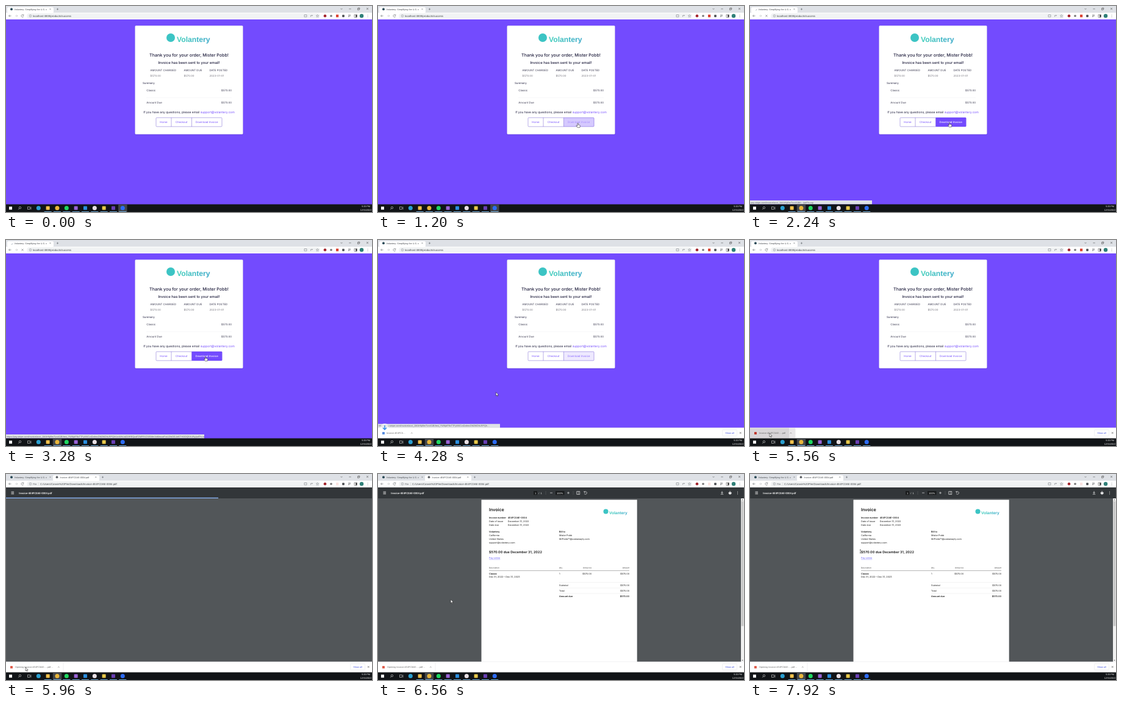
An HTML page for the animation above (8 s loop, 600 px wide and 338 px high).

```html
<!DOCTYPE html>
<html lang="en">
<head>
<meta charset="utf-8">
<title>Invoice download</title>
<style>
html, body { margin: 0; width: 100%; height: 100%; overflow: hidden; }
svg { display: block; text-rendering: geometricPrecision; }
#stage { width: 600px; height: 338px; font-family: "Liberation Sans", Arial, sans-serif; }
.inter { font-family: Inter, sans-serif; }
</style>
</head>
<body>
<svg id="stage" viewBox="0 0 600 338"></svg>
<script>
const DURATION = 8000;
const PURPLE = '#734bfe', INK = '#1c1b3a', GREY = '#5f6368';
const BRAND = 'Volantery', FILE = 'Invoice-4E4FC0AE-0004.pdf';
const URL_HEAD = 'pay.stripe.com/invoice/acct_1MAHfyBmTvrxX1B/t';
const LONG_URL = `https://${URL_HEAD}est_YWNjdF8xTTFyMXCztZzdmcDM2MDhLRPQhVzcWhUaDZrREQzaFZMFRVZXI5MmVoMmxwFsrU2htOGJzNTYtODQ5VURy/pdf?s=ap`;

const text = (x, y, s, size, fill, more = '') =>
  `<text x="${x}" y="${y}" font-size="${size}" fill="${fill}" ${more}>${s}</text>`;
const rect = (x, y, w, h, fill, more = '') =>
  `<rect x="${x}" y="${y}" width="${w}" height="${h}" fill="${fill}" ${more}/>`;
const dot = (x, y, r, fill, more = '') =>
  `<circle cx="${x}" cy="${y}" r="${r}" fill="${fill}" ${more}/>`;
const line = (d, stroke, width = .5) =>
  `<path d="${d}" fill="none" stroke="${stroke}" stroke-width="${width}"/>`;
const group = (id, body, more = '') => `<g id="${id}" ${more}>${body}</g>`;
const cross = (x, y, r, stroke = GREY, width = .5) =>
  line(`M${x - r} ${y - r}l${2 * r} ${2 * r}m0 ${-2 * r}l${-2 * r} ${2 * r}`, stroke, width);
const plus = (x, y, r, stroke) => line(`M${x - r} ${y}h${2 * r}M${x} ${y - r}v${2 * r}`, stroke, .6);
const MID = 'text-anchor="middle"', END = 'text-anchor="end"';
const MEDIUM = 'font-weight="500"', BOLD = 'font-weight="600"';

function logo(x, y, r, tx, ty, size) {
  return dot(x, y, r, '#3cc4c4') + text(tx, ty, BRAND, size, 'url(#teal)', 'font-weight="700" font-family="Liberation Sans, sans-serif"');
}

function site() {
  const small = (x, y, s, fill = '#3b3a50', more) => text(x, y, s, 4.38, fill, more);
  return rect(0, 22, 600, 304, PURPLE)
    + rect(211, 32.6, 178, 179, '#3a1fb0', 'rx="2" opacity=".3"')
    + rect(211.5, 32.2, 177, 178.3, '#fff', 'rx="1.5"')
    + logo(270, 52, 7, 280, 59.2, 12.2)
    + text(300, 83, 'Thank you for your order, Mister Pobb!', 7.05, INK, `${MID} ${MEDIUM}`)
    + text(300, 95.1, 'Invoice has been sent to your email!', 5.92, INK, `${MID} ${MEDIUM}`)
    + [[236.6, 'AMOUNT CHARGED', '$570.00'], [291.4, 'AMOUNT DUE', '$570.00'], [333.4, 'DATE POSTED', '2023-01-01']]
      .map(([x, a, b]) => small(x, 106.8, a) + small(x, 115.6, b, '#77767f')).join('')
    + small(224, 127.7, 'Summary', INK)
    + small(230.3, 140.2, 'Classic') + small(370, 140.2, '$570.00', '#3b3a50', END)
    + line('M230 150.5H370', '#eeeef2')
    + small(230.3, 160.2, 'Amount Due') + small(370, 160.2, '$570.00', '#3b3a50', END)
    + text(300, 176.1, `If you have any questions, please email <tspan fill="${PURPLE}">support@volantery.com</tspan>`, 4.98, INK, MID)
    + rect(246, 183.2, 108, 14.7, '#fff', 'rx="1.2" stroke="#8a78d8" stroke-width=".6"')
    + line('M271 183v15M304.5 183v15', '#8a78d8', .6)
    + small(258.4, 192.3, 'Home', PURPLE, MID) + small(287.6, 192.3, 'Checkout', PURPLE, MID)
    + small(329.2, 192.3, 'Download Invoice', PURPLE, MID)
    + group('hover', rect(304.5, 183, 49.8, 15, PURPLE, 'rx="1"') + small(329.2, 192.3, 'Download Invoice', '#fff', `${MID} ${MEDIUM}`));
}

function pdf() {
  const body = (x, y, s, more = '') => text(x, y, s, 3.75, '#1a1a1a', more);
  const head = (x, s, more) => text(x, 155.3, s, 3.1, '#333', more);
  const rows = (x, y, step, list, more) => list.map((s, i) => body(x, y + i * step, s, more)).join('');
  const icons = line('M275 28v6M320 28v6', '#6d7073', .4)
    + rect(255, 28, 6, 6.2, '#191b1c') + rect(291, 28, 14.5, 6.2, '#191b1c')
    + text(258, 32.5, '1', 4, '#fff', MID) + text(263.2, 32.5, '/ &#160;1', 4, '#fff')
    + text(298.2, 32.5, '100%', 4, '#fff', MID)
    + line('M282 31h4', '#fff', .6) + plus(312, 31, 1.9, '#fff')
    + rect(325.8, 28.7, 5, 4.6, 'none', 'stroke="#fff" stroke-width=".6"') + line('M328.3 28.7v4.6', '#fff')
    + line('M338 30a2.3 2.3 0 1 1 0 2M338 28v2h2', '#fff', .6);
  const paper = rect(169.5, 42.3, 255.2, 267, '#fff')
    + text(182, 60.7, 'Invoice', 7.1, '#111', BOLD) + logo(373.5, 61.5, 4, 379, 65.7, 6.6)
    + body(182, 73.2, 'Invoice number', BOLD) + body(212.7, 73.2, '4E4FC0AE-0004', BOLD)
    + rows(182, 79, 5.7, ['Date of issue', 'Date due']) + rows(212.7, 79, 5.7, ['December 31, 2022', 'December 31, 2022'])
    + body(182, 96.4, BRAND, BOLD) + rows(182, 102.1, 5.7, ['California', 'United States', 'support@volantery.com'])
    + body(297, 96.4, 'Bill to', BOLD) + rows(297, 102.1, 5.7, ['Mister Pobb', 'MrPobb71@castawayly.com'])
    + text(182, 129.9, '$570.00 due December 31, 2022', 5.5, '#111', BOLD)
    + text(182, 138.9, 'Pay online', 3.75, '#625afa', 'text-decoration="underline"')
    + head(182, 'Description') + head(297, 'Qty') + head(350, 'Unit price', END) + head(412, 'Amount', END)
    + line('M182 158.6H412', '#444', .4)
    + body(182, 164.6, 'Classic', BOLD) + body(182, 170.4, 'Dec 31, 2022 – Dec 31, 2023')
    + body(297, 164.6, '1') + body(350, 164.6, '$570.00', END) + body(412, 164.6, '$570.00', END)
    + line('M297 177.9H412M297 187H412M297 196H412', '#ddd', .4)
    + rows(297, 184.2, 9, ['Subtotal', 'Total']) + rows(412, 184.2, 9, ['$570.00', '$570.00'], END)
    + body(297, 202.2, 'Amount due', BOLD) + body(412, 202.2, '$570.00', `${BOLD} ${END}`);
  const scrollbar = rect(595, 40, 5, 269, '#f1f1f1') + rect(595.6, 44.5, 3.8, 205, '#c8c8c8')
    + '<path d="M596.4 43l1.1-1.5 1.1 1.5zM596.4 305l1.1 1.5 1.1-1.5z" fill="#555"/>';
  return rect(0, 22, 600, 304, '#525659')
    + group('paper', paper + scrollbar, 'class="inter"')
    + rect(0, 22, 600, 18, '#323639')
    + line('M8.5 29.2h4.6m-4.6 1.8h4.6m-4.6 1.8h4.6', '#fff', .7)
    + text(21.3, 32.5, FILE, 4.3, '#fff', 'font-weight="500" font-family="Roboto, sans-serif"')
    + rect(0, 38.7, 0, 1.3, '#8ab4f8', 'id="progress"')
    + group('pdfIcons', icons + line('M564 28.2v3.4m-1.5-1.5l1.5 1.6 1.5-1.6M561.8 33.2h4.4', '#fff', .7)
      + rect(574.8, 30, 4.6, 2.6, '#fff') + line('M575.8 28.8h2.6M575.8 33.2h2.6', '#fff', .8)
      + [29, 31, 33].map(y => dot(589.5, y, .5, '#fff')).join(''));
}

function tabs() {
  const title = text(13.6, 6.7, `${BRAND}: Simplifying the U.S. v`, 3.75, '#45494d');
  return rect(0, 0, 600, 11, '#dee1e6')
    + group('tabOne', rect(2, 2, 76, 9.5, '#fff', 'rx="2"') + plus(84.5, 5.2, 1.6, GREY))
    + group('tabTwo', rect(77, 2, 76, 9.5, '#fff', 'rx="2"') + dot(83.5, 5.2, 1.9, GREY)
      + text(88.5, 6.7, FILE, 3.75, '#45494d') + cross(147.3, 5.2, 1) + plus(158.5, 5.2, 1.6, GREY))
    + title + cross(72.5, 5.2, 1)
    + dot(9, 5.2, 2, '#2b4a57', 'id="favicon"')
    + group('spinner', line('M9 3.2a2 2 0 0 1 2 2', '#8b95a5', .6))
    + line('M548.5 4l1.5 1.5 1.5-1.5M562.3 4.8h3.4', '#333')
    + rect(576.7, 3.9, 2.3, 2.3, 'none', 'stroke="#333" stroke-width=".5"') + line('M577.6 3.9v-.9h2.3v2.3h-.9', '#333', .4)
    + cross(592.5, 4.5, 1.5, '#333');
}

function toolbar() {
  const right = line('M489 14.5h4v3.4h-4zM499.5 17.8v-2.2h3m-1-1l1 1-1 1', GREY)
    + line('M510.5 14l.7 1.5 1.6.1-1.2 1.1.4 1.6-1.5-.9-1.4.9.4-1.6-1.2-1.1 1.6-.1z', GREY, .4);
  return rect(0, 11, 600, 11, '#fff') + rect(34, 12, 481, 8.6, '#f1f3f4', 'rx="4.3"')
    + line('M8.6 16.2H4.6m1.8-1.8l-1.8 1.8 1.8 1.8', GREY, .6)
    + line('M15 16.2h4m-1.8-1.8l1.8 1.8-1.8 1.8', '#b8babd', .6)
    + group('reload', line('M28.6 15a2 2 0 1 0 .3 1.8M28.9 13.8v1.6h-1.6', GREY, .6))
    + group('stop', cross(27, 16.2, 1.6, GREY, .6))
    + dot(40, 16.2, 1.9, 'none', `stroke="${GREY}" stroke-width=".4"`) + line('M40 15.9v1.3M40 15v.4', GREY, .4)
    + group('siteUrl', text(44, 17.8, 'localhost:3000/products/success', 4.36, '#3c4043'))
    + group('fileUrl', text(44, 17.8, 'File', 4, GREY) + line('M53.3 14v4.4', '#bbb', .4)
      + text(56, 17.8, `C:/Users/Corwin%20Pim/Downloads/${FILE}`, 4.3, '#3c4043'))
    + right + dot(523, 16.2, 2.3, '#a3242c') + dot(533, 16.2, 1.8, '#777')
    + rect(541, 14.2, 4.2, 4.2, '#d9402f', 'id="badge"')
    + rect(551.2, 14.6, 3.6, 3.6, '#4a4d51', 'rx=".6"') + line('M561 14.8h4m-4 1.4h4m-4 1.4h2', '#4a4d51', .6)
    + rect(571, 14.3, 4.2, 4, 'none', 'stroke="#333" stroke-width=".5"') + rect(573.4, 14.3, 1.8, 4, '#333')
    + dot(583, 16.2, 3.2, '#2f8078') + [14.4, 16.2, 18].map(y => dot(593, y, .45, GREY)).join('');
}

function shelf() {
  const item = (id, x, s, mark, arrow) =>
    group(id, rect(7, 315, 4, 4, mark, 'rx=".5"') + text(x, 318.2, s, 3.75, '#666') + arrow);
  const chevron = x => line(`M${x - 1.2} 317.4l1.2-1.2 1.2 1.2`, '#555', .6);
  return rect(0, 308, 600, 18, '#fff') + line('M0 308H600', '#dadce0', .4)
    + group('itemHover', rect(0, 308.3, 64, 17, '#d8d5d8') + rect(64, 308.3, 10.5, 17, '#e9e7e9'))
    + item('starting', 14, 'Invoice-4E4FC0…', '#5a8fe0', chevron(55.3))
    + item('ready', 15, 'Invoice-4E4FC0AE-….pdf', '#c0392f', chevron(67))
    + item('opening', 15, 'Opening Invoice-4E4FC0AE-….pdf…', '#e0604f', chevron(86.3) + line('M94 310v14', '#dadce0', .4))
    + rect(564.5, 311.5, 24, 10, '#fff', 'rx="1.3" stroke="#dadce0" stroke-width=".4"')
    + text(576.5, 318, 'Show all', 3.8, '#3d4fe0', MID) + cross(594.2, 316.5, 1.4, '#444', .6);
}

function taskbar() {
  const icons = ['#2a9fd0', '#f2c24c', '#e8b63a', '#1ed760', '#9a63d8', '#2a8fe0', '#e8e0e4', '#e8c94a', '#6a3fb5', '#2d6cf6'];
  const tile = (id, x) => group(id, rect(x - 7.2, 325.4, 14.4, 12.6, '#43464a'));
  return rect(0, 325.4, 600, 12.6, '#111417') + tile('chatTile', 191.3) + tile('webTile', 84)
    + rect(5, 329.2, 5, 5, '#f5f5f5')
    + dot(23, 331, 1.7, 'none', 'stroke="#fff" stroke-width=".5"') + line('M21.8 332.3l-1.8 1.8', '#fff')
    + rect(35.6, 329.8, 4, 3.8, 'none', 'stroke="#ddd" stroke-width=".6"') + line('M41 329.5v4.4', '#ddd', .6)
    + icons.map((c, i) => {
      const x = 53.3 + i * 15.33;
      const mark = [1, 4, 5, 7, 8].includes(i) ? rect(x - 3, 328.6, 6, 6, c, 'rx=".8"') : dot(x, 331.6, 3.5, c);
      return mark + (i ? rect(x - 6, 337.1, 12, .9, '#76b9ed') : '');
    }).join('')
    + text(590, 330.2, '5:33 PM', 3.7, '#fff', MID) + text(590, 336, '12/31/2022', 3.7, '#fff', MID);
}

const stage = document.getElementById('stage');
stage.innerHTML = '<defs><linearGradient id="teal"><stop stop-color="#45d0bd"/><stop offset="1" stop-color="#3aa9c9"/></linearGradient></defs>'
  + group('site', site(), 'class="inter"') + group('pdf', pdf())
  + group('status', '<svg id="bubble" x="0" y="319" width="200" height="6.6">' + rect(0, 0, 600, 7, '#dee1e6')
    + text(1.2, 4.7, '', 3.75, GREY, 'id="link"') + '</svg>')
  + group('shelf', shelf())
  + group('drop', dot(0, 0, 7, '#fff', 'opacity=".6"') + line('M0-4V3M-3 0L0 3.2 3 0', '#3f8fe8', 1.6))
  + tabs() + toolbar() + taskbar()
  + group('arrow', '<path d="M0 0v6l1.4-1.2.9 2 .9-.4-.9-1.9h1.9z" fill="#fff" stroke="#111" stroke-width=".5"/>')
  + group('hand', '<path d="M-.6-2.8q.7-.8 1.3 0v2.3l2.4.6q.8.3.7 1.2L3.2 4H-.6L-2.6 1.2q.2-1 1.2-.3l.8.6z" fill="#fff" stroke="#111" stroke-width=".5"/>')
  + group('beam', line('M-1.1-2.8q1.1 0 1.1.6 0-.6 1.1-.6M0-2.2v4.4M-1.1 2.8q1.1 0 1.1-.6 0 .6 1.1.6', '#111', .6));

const $ = Object.fromEntries([...stage.querySelectorAll('[id]')].map(e => [e.id, e]));
const show = (id, on) => $[id].setAttribute('visibility', on ? 'inherit' : 'hidden');
const move = (id, x, y) => $[id].setAttribute('transform', `translate(${x} ${y})`);
const ramp = (t, from, to) => Math.min(1, Math.max(0, (t - from) / (to - from)));
const smooth = p => p * p * (3 - 2 * p);
const mix = (a, b, p) => a + (b - a) * p;

// pointer path: time, x, y
const path = [[400, 420, 330], [1240, 327, 194.5], [4080, 327, 194.5], [4280, 194, 249.5], [4800, 32, 317], [6160, 32, 317], [6880, 181, 127]];
function pointer(t) {
  const i = Math.max(1, path.findIndex(k => k[0] > t));
  const [a, b] = t >= 6880 ? path.slice(-2) : [path[i - 1], path[i]];
  let p = ramp(t, a[0], b[0]);
  if (i !== 3) p = i === 4 ? 1 - (1 - p) ** 2 : smooth(p);
  return [mix(a[1], b[1], p), mix(a[2], b[2], p)];
}

function draw(t) {
  const inPdf = t >= 5760, loaded = t >= 6080, loading = t >= 1720 && t < 3700;
  show('site', !inPdf);
  show('pdf', inPdf);
  show('tabOne', !inPdf);
  show('tabTwo', inPdf);
  show('siteUrl', !inPdf);
  show('fileUrl', inPdf);
  $.badge.setAttribute('opacity', inPdf ? .15 : 1);
  for (const id of ['paper', 'pdfIcons']) show(id, inPdf && loaded);
  if (!inPdf) for (const id of ['paper', 'pdfIcons']) show(id, false);
  $.progress.setAttribute('width', loaded ? 0 : 348 * ramp(t, 5780, 5940));

  show('favicon', !loading);
  show('spinner', loading);
  show('stop', loading);
  show('reload', !loading);
  $.spinner.setAttribute('transform', `rotate(${t * .36 % 360} 9 5.2)`);
  show('chatTile', t < 1720);
  show('webTile', t >= 1720);

  $.hover.setAttribute('opacity', ramp(t, 1160, 1300) * (1 - ramp(t, 4130, 4300)));
  const rise = ramp(t, 4080, 4220), away = t >= 4160, wide = smooth(ramp(t, 2760, 3000));
  show('status', t >= 1240 && t < 4480);
  move('status', 0, -17.5 * rise);
  $.bubble.setAttribute('width', away ? 200 : mix(200, 325, wide));
  $.link.textContent = away ? LONG_URL.slice(0, 90) + '…' : t < 2760 ? URL_HEAD + '…/pdf?s=ap' : LONG_URL;

  show('shelf', t >= 4080);
  move('shelf', 0, 18 * (1 - rise));
  show('starting', t >= 4080 && t < 4600);
  show('ready', t >= 4600 && t < 5720);
  show('opening', t >= 5720);
  show('itemHover', t >= 4700 && t < 5720);
  show('drop', t >= 4080 && t < 4560);
  move('drop', 11, mix(301, 317, ramp(t, 4080, 4540)));
  $.drop.setAttribute('opacity', 1 - ramp(t, 4360, 4560));

  const [x, y] = pointer(t);
  const kind = t >= 1180 && t < 4120 ? 'hand' : t >= 6820 ? 'beam' : 'arrow';
  for (const id of ['arrow', 'hand', 'beam']) {
    show(id, id === kind && t >= 400);
    move(id, x, y);
  }
}

function tick() {
  draw(performance.now() % DURATION);
  requestAnimationFrame(tick);
}
tick();
</script>
</body>
</html>
```
